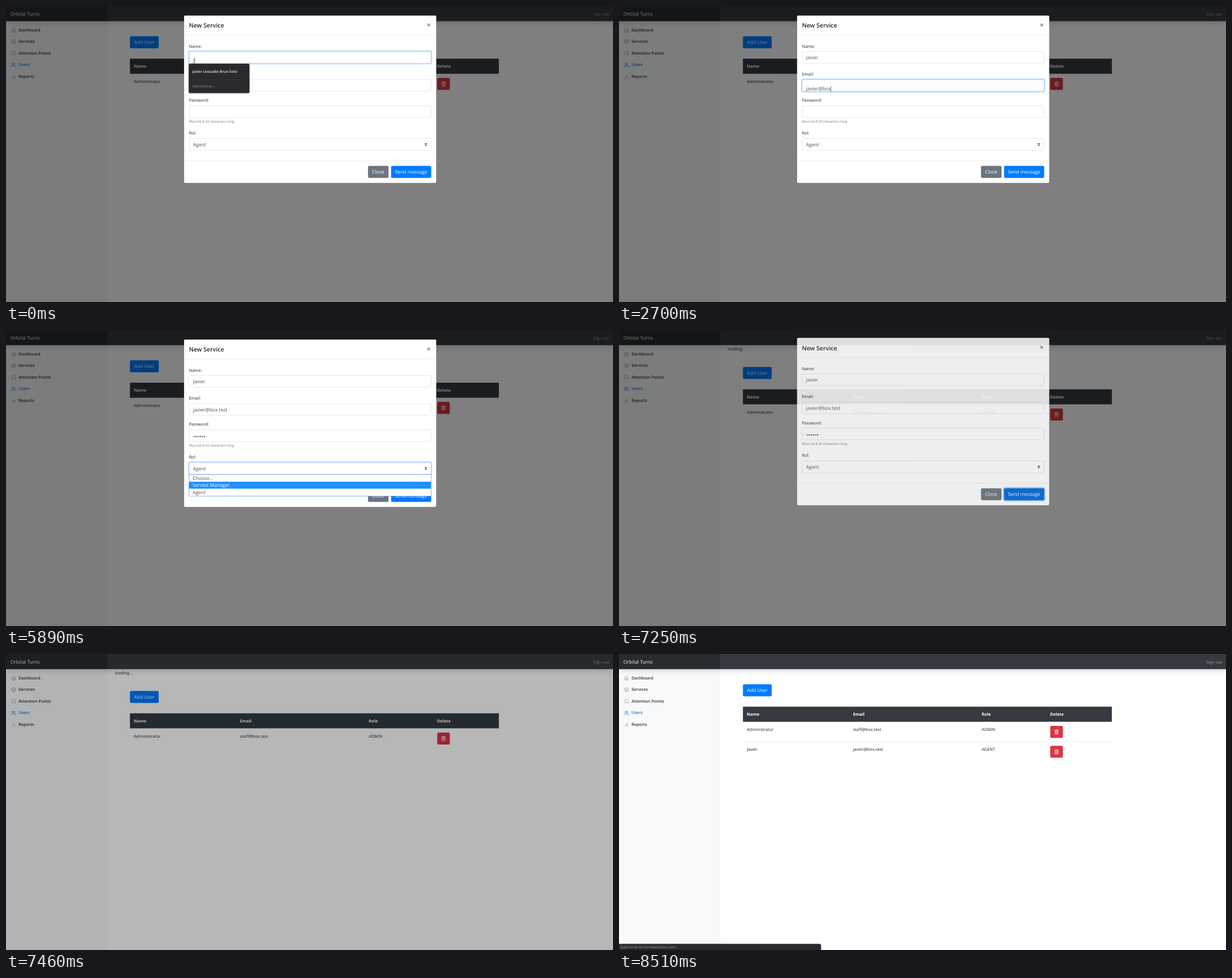
Recreate the animation shown at these times as an HTML page. Size 1070x523 px, loop 8.63 s.

```html
<!DOCTYPE html>
<html lang="en">
<head>
<meta charset="utf-8">
<title>Users</title>
<style>
html, body { margin: 0; width: 100%; height: 100%; overflow: hidden; background: #fff; }
#page {
  position: absolute; left: 0; top: 0; width: 1920px; height: 939px; overflow: hidden;
  transform: scale(.557292); transform-origin: 0 0;
  font: 13.3px "Open Sans", "Noto Sans", sans-serif; color: #212529; background: #fff;
  text-rendering: geometricPrecision;
}
#page div, #page p, #page svg { position: absolute; box-sizing: border-box; margin: 0; }
/* text lines are placed by their vertical centre */
p { line-height: 0; white-space: nowrap; padding-top: .7px; }
.big { font-size: 15.2px; }
.semi { font-weight: 600; }
svg { fill: none; stroke: currentColor; stroke-linecap: round; stroke-linejoin: round; }

#side { left: 0; top: 0; width: 320px; height: 939px; background: #f8f9fa; box-shadow: inset -1px 0 rgba(0,0,0,.1); }
#side p { left: 39.5px; font-size: 13.1px; font-weight: 600; color: #333; }
#side svg { left: 16px; width: 16px; height: 16px; stroke-width: 2; color: #999; }
#side .on { color: #007bff; }
#nav { left: 0; top: 0; width: 1920px; height: 48px; background: #343a40; box-shadow: 0 8px 16px rgba(0,0,0,.15); }
#brand { width: 320px; height: 48px; background: rgba(0,0,0,.25); box-shadow: inset -1px 0 rgba(0,0,0,.25); }

#content { left: 0; top: 0; width: 1920px; height: 939px; }
.btn { height: 38px; border-radius: 4px; background: #007bff; color: #fff; }
.btn p { left: 13px; top: 19px; font-size: 15.2px; }
#head { left: 392px; top: 166.5px; width: 1167px; height: 48px; background: #343a40; color: #fff; font-weight: 700; }
.row { left: 392px; width: 1167px; height: 63px; border-top: 1px solid #dee2e6; }
.c1 { left: 12px; } .c2 { left: 348px; } .c3 { left: 755px; } .c4 { left: 971.5px; }
#head p { top: 23.5px; }
.row p { top: 22.5px; }
.trash { left: 971.5px; top: 12px; width: 40px; background: #dc3545; }
.trash svg { left: 13px; top: 11px; width: 14px; height: 16px; stroke-width: 1.6; }

#shade { left: 0; top: 0; width: 1920px; height: 939px; background: #000; }
#modal {
  left: 561.5px; top: 29px; width: 800px; height: 533px; border-radius: 4.8px;
  background: #fff; background-clip: padding-box; border: 1px solid rgba(0,0,0,.2);
}
#modal > p { left: 16px; }
.rule { left: 0; width: 798px; height: 1px; background: #dee2e6; }
.field {
  --g: 0; left: 16px; width: 766px; height: 38px; border-radius: 4px; background: #fff;
  border: 1px solid color-mix(in srgb, #80bdff calc(var(--g) * 100%), #ced4da);
  box-shadow: 0 0 0 3.2px rgba(0,123,255,calc(.25 * var(--g)));
}
.field p { left: 12px; top: 18px; font-size: 15.2px; color: #495057; }
.caret { display: inline-block; width: 1.5px; height: 20px; margin-right: -1.5px; vertical-align: middle; background: #222; }
.dot { display: inline-block; width: 4.4px; height: 4.4px; margin: 0 1.1px; border-radius: 50%; background: #495057; vertical-align: middle; }

.list { left: 577.5px; overflow: hidden; border-radius: 4px; background: #292a2d; color: #e8eaed; box-shadow: 0 1px 5px rgba(0,0,0,.45); font-size: 11.5px; }
.list p { left: 12px; font-weight: 600; }
.list p.dim { font-weight: 400; color: #8d9196; }
#menu { left: 577.5px; top: 457.5px; width: 767px; height: 69px; background: #fff; border: 1px solid #4a7fd8; }
#menu div { left: 0; width: 765px; height: 22.3px; color: #495057; font-size: 15.2px; }
#menu p { left: 12px; top: 11px; }
#menu .on { background: #1e90ff; color: #fff; }
#status { left: 0; top: 919px; width: 639px; height: 20px; border-radius: 0 5px 0 0; background: #292a2d; box-shadow: 0 0 3px rgba(0,0,0,.4); }
#status p { left: 4px; top: 10px; font-size: 11.4px; color: #9aa0a6; }
</style>
</head>
<body>
<div id="page">
  <div id="side"></div>
  <p id="loading" style="left:344px;top:58.5px">loading...</p>
  <div id="content">
    <div class="btn" style="left:392px;top:96px;width:91px"><p>Add User</p></div>
    <div id="head"><p class="c1">Name</p><p class="c2">Email</p><p class="c3">Role</p><p class="c4">Delete</p></div>
  </div>
  <div id="nav">
    <div id="brand"><p class="big" style="left:14px;top:24px;color:#fff">Orbital Turns</p></div>
    <p style="right:12px;top:24px;color:rgba(255,255,255,.5)">Sign out</p>
  </div>
  <div id="shade"></div>

  <div id="modal">
    <p class="semi" style="top:31px;font-size:19px">New Service</p>
    <p style="left:768px;top:29px;font-size:22.8px;font-weight:700;color:rgba(0,0,0,.5)">×</p>
    <div class="rule" style="top:62px"></div>
    <p style="top:96.5px">Name:</p>
    <div class="field" id="name" style="top:114px"><p></p></div>
    <p style="top:185.5px">Email:</p>
    <div class="field" id="email" style="top:203px"><p></p></div>
    <p style="top:268px">Password:</p>
    <div class="field" id="pass" style="top:286px"><p></p></div>
    <p style="top:336.5px;font-size:10.6px;color:#6c757d">Must be 8-20 characters long.</p>
    <p style="top:372px">Rol:</p>
    <div class="field" id="role" style="top:390px">
      <p>Agent</p>
      <svg style="right:12px;top:13px;width:8px;height:10px" viewBox="0 0 4 5"><path d="M2 0L0 2h4zM2 5L0 3h4z" fill="#343a40" stroke="none"/></svg>
    </div>
    <div class="rule" style="top:460px"></div>
    <div class="btn" style="left:582.5px;top:476.5px;width:65px;background:#6c757d"><p>Close</p></div>
    <div class="btn" id="send" style="left:655px;top:476.5px;width:127px"><p>Send message</p></div>
  </div>

  <div class="list" id="names" style="top:182.5px;width:192px;height:93px">
    <p style="top:26px">Javier Leocadio Brun Soto</p>
    <div style="left:0;top:51px;width:192px;height:1px;background:#3c4043"></div>
    <p class="dim" style="top:73px">Administrar...</p>
  </div>
  <div class="list" id="mails" style="top:272.5px;width:253px"></div>
  <div id="menu"></div>
  <div id="status"><p></p></div>
</div>

<script>
const LOOP = 8630;
const $ = id => document.getElementById(id);
const clamp = v => Math.min(1, Math.max(0, v));
const ramp = (t, start, ms) => clamp((t - start) / ms);
const smooth = v => v * v * (3 - 2 * v);
const show = (el, on) => { el.style.visibility = on ? 'visible' : 'hidden'; };
const within = (t, a, b) => t >= a && t < b;

// sidebar
[
  ['Dashboard', 'M3 9l9-7 9 7v11a2 2 0 0 1-2 2H5a2 2 0 0 1-2-2zM9 22V12h6v10'],
  ['Services', 'M12 2L2 7l10 5 10-5zM2 17l10 5 10-5M2 12l10 5 10-5'],
  ['Attention Points', 'M19 21l-7-5-7 5V5a2 2 0 0 1 2-2h10a2 2 0 0 1 2 2z'],
  ['Users', 'M17 21v-2a4 4 0 0 0-4-4H5a4 4 0 0 0-4 4v2M5 7a4 4 0 1 0 8 0a4 4 0 1 0-8 0M23 21v-2a4 4 0 0 0-3-3.87M16 3.13a4 4 0 0 1 0 7.75'],
  ['Reports', 'M18 20V10M12 20V4M6 20v-6']
].forEach(([label, path], i) => {
  const y = 74.5 + 37 * i, on = label === 'Users' ? 'on' : '';
  $('side').innerHTML += `<svg class="${on}" viewBox="0 0 24 24" style="top:${y - 7}px"><path d="${path}"/></svg>
    <p class="${on}" style="top:${y}px">${label}</p>`;
});

// table rows
const trash = `<div class="btn trash"><svg viewBox="0 0 14 16"><path d="M.9 3.2h12.2M4.3 3l.9-2h3.6l.9 2M2.2 3.4v10.4a1.3 1.3 0 0 0 1.3 1.3h7a1.3 1.3 0 0 0 1.3-1.3V3.4M5.3 6.3v5.8M8.7 6.3v5.8"/></svg></div>`;
const rows = [
  ['Administrator', 'staff@box.test', 'ADMIN'],
  ['Javier', 'javier@box.test', 'AGENT']
].map((cells, i) => {
  const row = document.createElement('div');
  row.className = 'row';
  row.style.top = 214.5 + 63 * i + 'px';
  row.innerHTML = cells.map((c, k) => `<p class="c${k + 1}">${c}</p>`).join('') + trash;
  $('content').append(row);
  return row;
});

// suggestions and options
[
  'javier.brun-s@mail.colegiolumen.test',
  'javitobrun42@post.test',
  'javier.brun.s@correo.test',
  'javier.bn.st@post.test'
].forEach(m => { $('mails').innerHTML += `<p>${m}</p>`; });
const mails = [...$('mails').children];
['Choose...', 'Service Manager', 'Agent'].forEach((o, i) => {
  $('menu').innerHTML += `<div style="top:${22.3 * i}px"><p>${o}</p></div>`;
});
const options = [...$('menu').children];

// typed fields: focus span and the time of each key
const fields = [
  { id: 'name', text: 'Javier', from: -300, to: 770, keys: [-100, 130, 230, 430, 530, 690] },
  { id: 'email', text: 'javier@box.test', from: 770, to: 3480,
    keys: [1180, 1440, 1470, 1630, 1720, 1900, 2230, 2500, 2600, 2700, 2900, 3060, 3150, 3240, 3330] },
  { id: 'pass', text: '', from: 3480, to: 5700, keys: [3780, 3980, 4080, 4230, 4330, 4490] },
  { id: 'role', from: 5700, to: 7110 }
];

function drawField(f, t) {
  const el = $(f.id);
  el.style.setProperty('--g', smooth(ramp(t, f.from, 150)) - smooth(ramp(t, f.to, 150)));
  if (!f.keys) return;
  const done = f.keys.filter(k => k <= t);
  const last = Math.max(f.from, ...done);
  const lit = within(t, f.from, f.to) && Math.floor((t - last) / 530) % 2 === 0;
  const value = f.text ? f.text.slice(0, done.length) : '<i class="dot"></i>'.repeat(done.length);
  const html = value + (lit ? '<i class="caret"></i>' : '');
  if (f.html !== html) el.firstChild.innerHTML = f.html = html;
}

function draw(t) {
  fields.forEach(f => drawField(f, t));

  show($('names'), t < 770);
  show($('mails'), within(t, 1230, 2270));
  const short = t >= 1810;
  let y = 26;
  mails.forEach((m, i) => {
    const on = !(short && i === 1);
    m.style.display = on ? '' : 'none';
    m.style.top = y + 'px';
    if (on) y += 36;
  });
  $('mails').style.height = y - 10 + 'px';

  show($('menu'), within(t, 5790, 6440));
  const picked = within(t, 5890, 6180) ? 1 : 2;
  options.forEach((o, i) => { o.className = i === picked ? 'on' : ''; });

  const hover = smooth(ramp(t, 7050, 150)), press = smooth(ramp(t, 7110, 150));
  $('send').style.background = `rgb(0,${123 - 18 * hover},${255 - 38 * hover})`;
  $('send').style.boxShadow = `0 0 0 3.2px rgba(38,143,255,${.5 * press})`;

  const lift = 1 - Math.pow(1 - ramp(t, 7230, 300), 1.6);
  $('modal').style.opacity = 1 - ramp(t, 7230, 150);
  $('modal').style.transform = `translateY(${-50 * lift}px)`;
  $('shade').style.opacity = .5 * (1 - ramp(t, 7395, 150));

  const loading = within(t, 7230, 7640);
  show($('loading'), loading);
  $('content').style.transform = `translateY(${loading ? 21 : 0}px)`;
  show(rows[1], t >= 8330);

  show($('status'), t >= 7710);
  $('status').firstChild.textContent = t < 8160 ? 'Estableciendo conexión segura...' : 'Esperando kit.fontawesome.com...';
}

let start;
function tick(now) {
  start ??= now;
  draw((now - start) % LOOP);
  requestAnimationFrame(tick);
}
draw(0);
requestAnimationFrame(tick);
</script>
</body>
</html>
```
